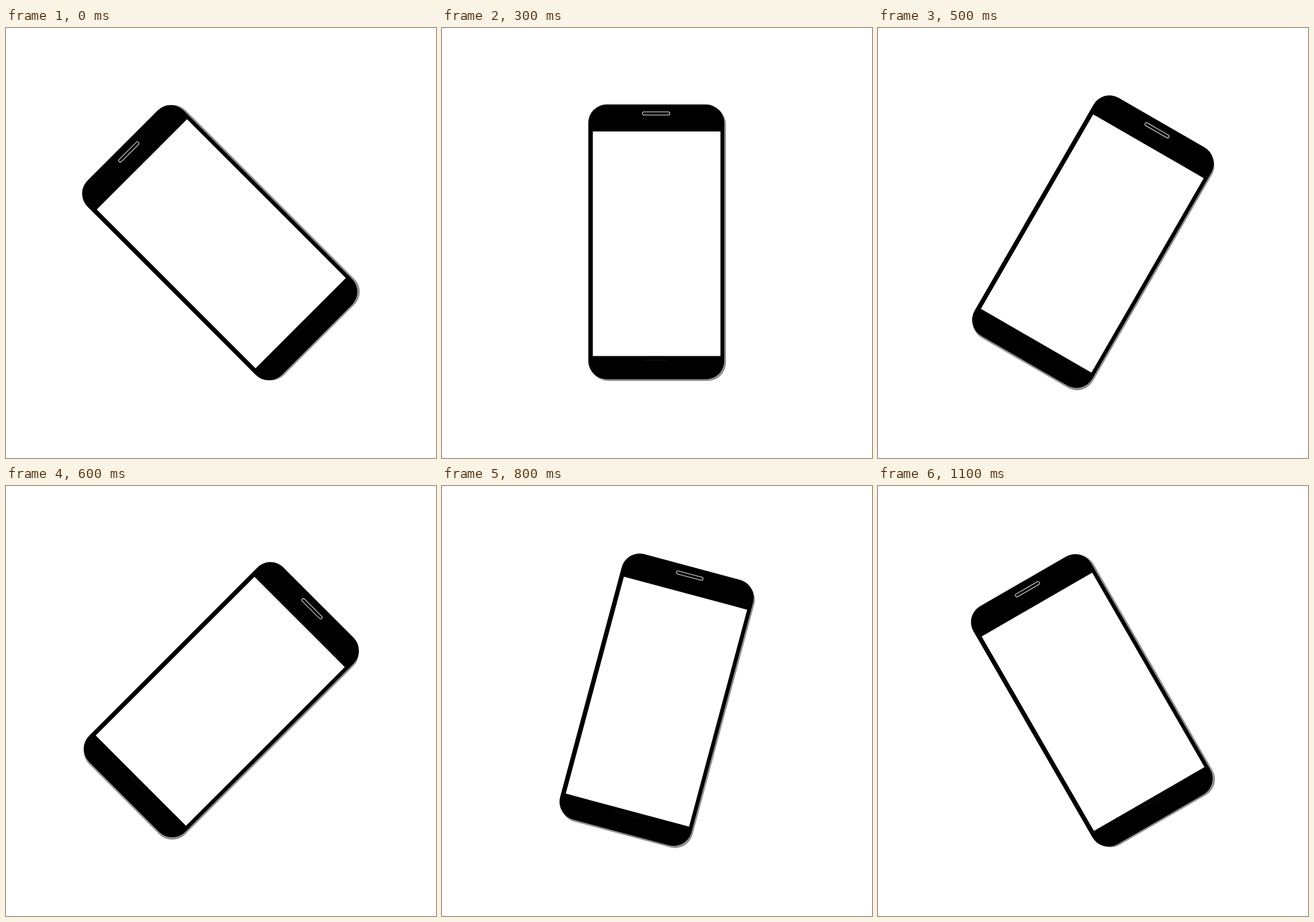
Animation, 748 px wide and 748 px high, one loop 1200 ms. Source, as an HTML page:

```html
<!DOCTYPE html>
<html lang="en">
<head>
<meta charset="utf-8">
<title>Tilting phone</title>
<style>
  html, body { margin: 0; width: 100%; height: 100%; overflow: hidden; background: #fff; }
  svg { display: block; width: 100vw; height: 100vh; }
</style>
</head>
<body>
<svg viewBox="0 0 748 748">
  <g id="phone">
    <rect x="257.5" y="136" width="236.5" height="478" rx="32" fill="#909090"/>
    <rect x="254.5" y="133" width="236.5" height="478" rx="32"/>
    <rect x="262.4" y="180" width="222" height="390.6" fill="#fff"/>
    <rect x="348.7" y="145.9" width="47.6" height="5.4" rx="2.7" fill="none" stroke="#ccc" stroke-width="1.3"/>
    <path d="M349 578H396" stroke="#151515"/>
  </g>
</svg>
<script>
  const STEP_MS = 100, STEPS = 12, STEP_DEG = 15, MAX_DEG = 45;
  const phone = document.getElementById('phone');
  const start = performance.now();

  // The tilt swings from -45 to 45 degrees and back in hard steps.
  function draw(now) {
    const step = Math.floor(Math.max(0, now - start) / STEP_MS) % STEPS;
    const angle = MAX_DEG - STEP_DEG * Math.abs(step - STEPS / 2);
    phone.setAttribute('transform', `rotate(${angle} 374 374)`);
    requestAnimationFrame(draw);
  }
  draw(start);
</script>
</body>
</html>
```
